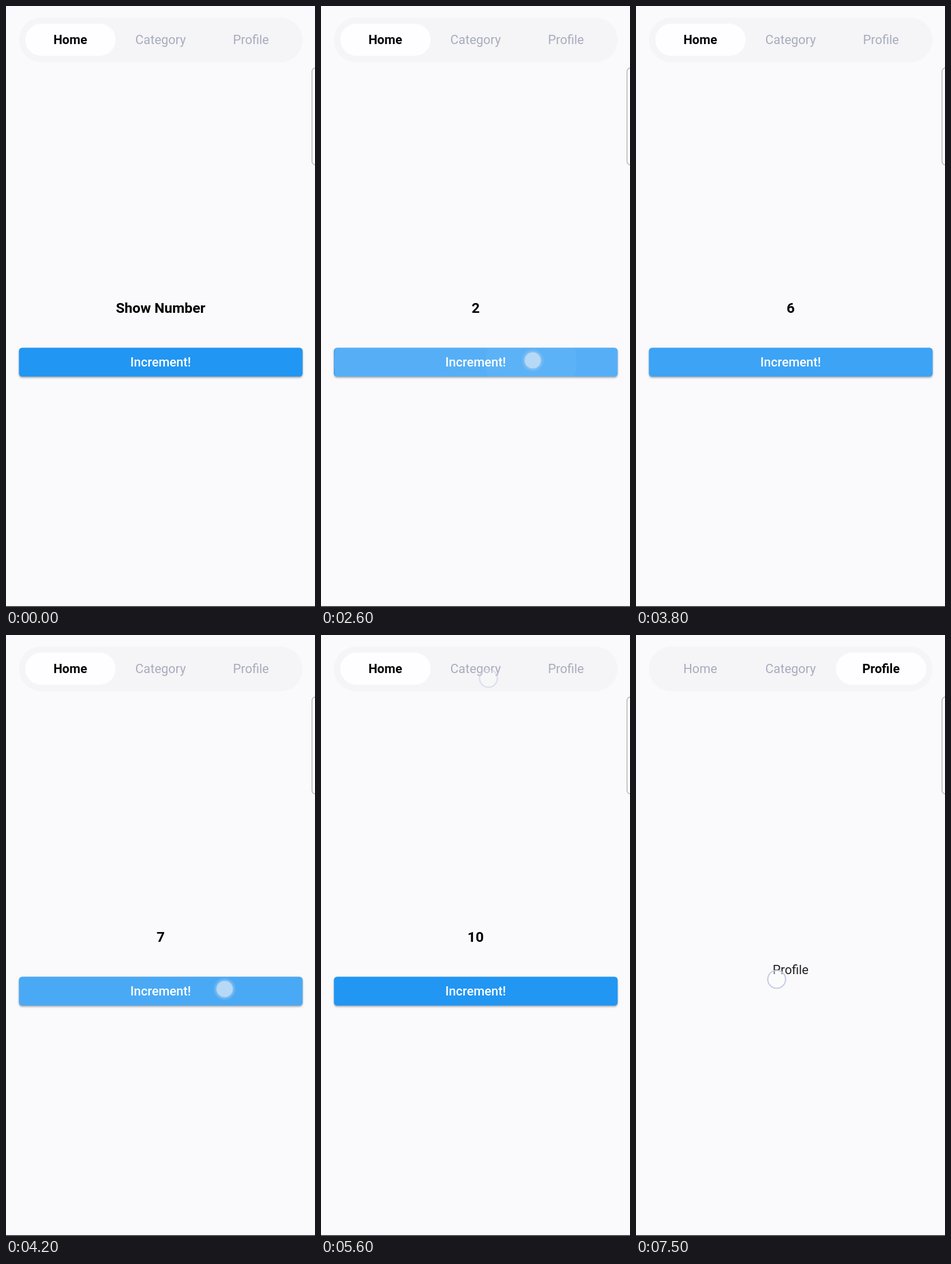
Animation of 537x1042 px, one loop 8000 ms. Source, as an HTML page:

```html
<!DOCTYPE html>
<html lang="en">
<head>
<meta charset="utf-8">
<title>Counter tabs</title>
<style>
  html, body { margin: 0; width: 100%; height: 100%; overflow: hidden; background: #faf9fb; }
  svg { display: block; width: 537px; height: 1042px; }
  text { font-family: Roboto, sans-serif; font-size: 21.9px; text-anchor: middle; }
  .button { filter: drop-shadow(0 2px 1.5px rgba(0, 0, 0, .32)); }
</style>
</head>
<body>
<svg viewBox="0 0 537 1042">
  <defs>
    <clipPath id="buttonClip"><rect x="22.5" y="592.5" width="493" height="50" rx="5.5"/></clipPath>
    <radialGradient id="glow">
      <stop offset=".72" stop-color="#8cc4f5" stop-opacity=".75"/>
      <stop offset="1" stop-color="#8cc4f5" stop-opacity="0"/>
    </radialGradient>
  </defs>
  <rect x="22.5" y="20" width="493" height="77.5" rx="38.7" fill="#f5f4f6"/>
  <rect id="pill" x="33.5" y="30.5" width="157" height="56" rx="28" fill="#fefdff"/>
  <g id="tabs"></g>
  <rect x="531.8" y="107.5" width="30" height="168" rx="6" fill="#fcfbfd" stroke="#b4b3b6" stroke-width="1.5"/>
  <rect y="1040.7" width="537" height="1.3" fill="#151515"/>

  <g id="home">
    <text id="count" x="268.7" y="532.4" style="font-size:24.6px;font-weight:600"></text>
    <rect class="button" x="22.5" y="592.5" width="493" height="50" rx="5.5" fill="#2196f3"/>
    <g id="ripples" clip-path="url(#buttonClip)" fill="#fff"></g>
    <text x="268.7" y="624.8" fill="#fff" font-weight="500">Increment!</text>
  </g>
  <text id="page" x="268.7" y="588" fill="#222"></text>

  <g id="dot">
    <circle r="20" fill="url(#glow)"/>
    <circle r="14.6" fill="#b5d9f7" stroke="#8fbde6" stroke-width="1"/>
  </g>
  <circle id="ring" r="15.5" fill="#fff" fill-opacity=".4" stroke="#c3cde4" stroke-width="2.2"/>
</svg>
<script>
const LOOP = 8000, STEP = 100, SLIDE = 300;
const LABELS = ['Home', 'Category', 'Profile'];
const TAPS = [2425, 2590, 2740, 2890, 3040, 3500, 3940, 4250, 4560, 5000];
const SWITCHES = [6260, 7090];

// [start, end, x, y, opacity]
const RINGS = [
  [5600, 5700, 291, 75, .55],
  [5700, 5800, 304, 65, .25],
  [7400, 7500, 236, 628, .6],
  [7500, 8000, 244.5, 597, 1]
];
const TOUCHES = TAPS.map((t, i) => [t - 120, t + 40, 366 + 2 * i, 614.5 - i / 9])
  .concat([[6240, 6420, 291, 62], [7060, 7220, 461, 62]]);

const $ = id => document.getElementById(id);
const clamp = v => Math.min(1, Math.max(0, v));
const mix = (a, b, k) => a + (b - a) * k;

function add(parent, tag, attrs) {
  const el = document.createElementNS('http://www.w3.org/2000/svg', tag);
  set(el, attrs);
  return parent.appendChild(el);
}

function set(el, attrs) {
  for (const key in attrs) el.setAttribute(key, attrs[key]);
}

// Standard "ease" curve, cubic-bezier(.25, .1, .25, 1)
function ease(x) {
  if (x <= 0 || x >= 1) return clamp(x);
  const bez = (a, b, s) => 3 * a * s * (1 - s) ** 2 + 3 * b * s * s * (1 - s) + s ** 3;
  let lo = 0, hi = 1;
  for (let i = 0; i < 20; i++) {
    const mid = (lo + hi) / 2;
    if (bez(.25, .25, mid) < x) lo = mid; else hi = mid;
  }
  return bez(.1, 1, lo);
}

const tabs = LABELS.map((label, i) => {
  const el = add($('tabs'), 'text', { x: 111.7 + 157 * i, y: 66 });
  el.textContent = label;
  return el;
});
const ripples = TAPS.map(() => add($('ripples'), 'circle', { cy: 617 }));

function drawTabs(t) {
  const pos = SWITCHES.reduce((sum, s) => sum + ease((t - s) / SLIDE), 0);
  set($('pill'), { x: 33.5 + 157 * pos });
  tabs.forEach((el, i) => {
    const on = clamp(1 - Math.abs(pos - i));
    const rgb = [168, 172, 190].map(c => Math.round(mix(c, 5, on)));
    set(el, { fill: `rgb(${rgb})`, 'font-weight': on > .5 ? 600 : 400 });
  });
  const page = SWITCHES.filter(s => t >= s).length;
  $('home').style.display = page ? 'none' : '';
  $('page').textContent = page ? LABELS[page] : '';
}

function drawCounter(t) {
  $('count').textContent = TAPS.filter(tap => t >= tap).length || 'Show Number';
  ripples.forEach((el, i) => {
    const age = t - TAPS[i];
    const k = ease(age / 225);
    const alpha = .24 * clamp(age / 75) * clamp((375 - age) / 150);
    set(el, {
      cx: mix(TOUCHES[i][2], 268.7, k),
      r: mix(74, 254, k),
      opacity: alpha
    });
  });
}

function drawPointer(el, spans, t) {
  const span = spans.find(([from, to]) => t >= from && t < to);
  el.style.display = span ? '' : 'none';
  if (!span) return;
  const [, , x, y, opacity = 1] = span;
  set(el, { transform: `translate(${x} ${y})`, opacity });
}

const start = performance.now();
function frame(now) {
  const elapsed = Math.max(0, now - start) % LOOP;
  const t = Math.floor(elapsed / STEP) * STEP;
  drawTabs(t);
  drawCounter(t);
  drawPointer($('dot'), TOUCHES, t);
  drawPointer($('ring'), RINGS, t);
  requestAnimationFrame(frame);
}
frame(start);
</script>
</body>
</html>
```
